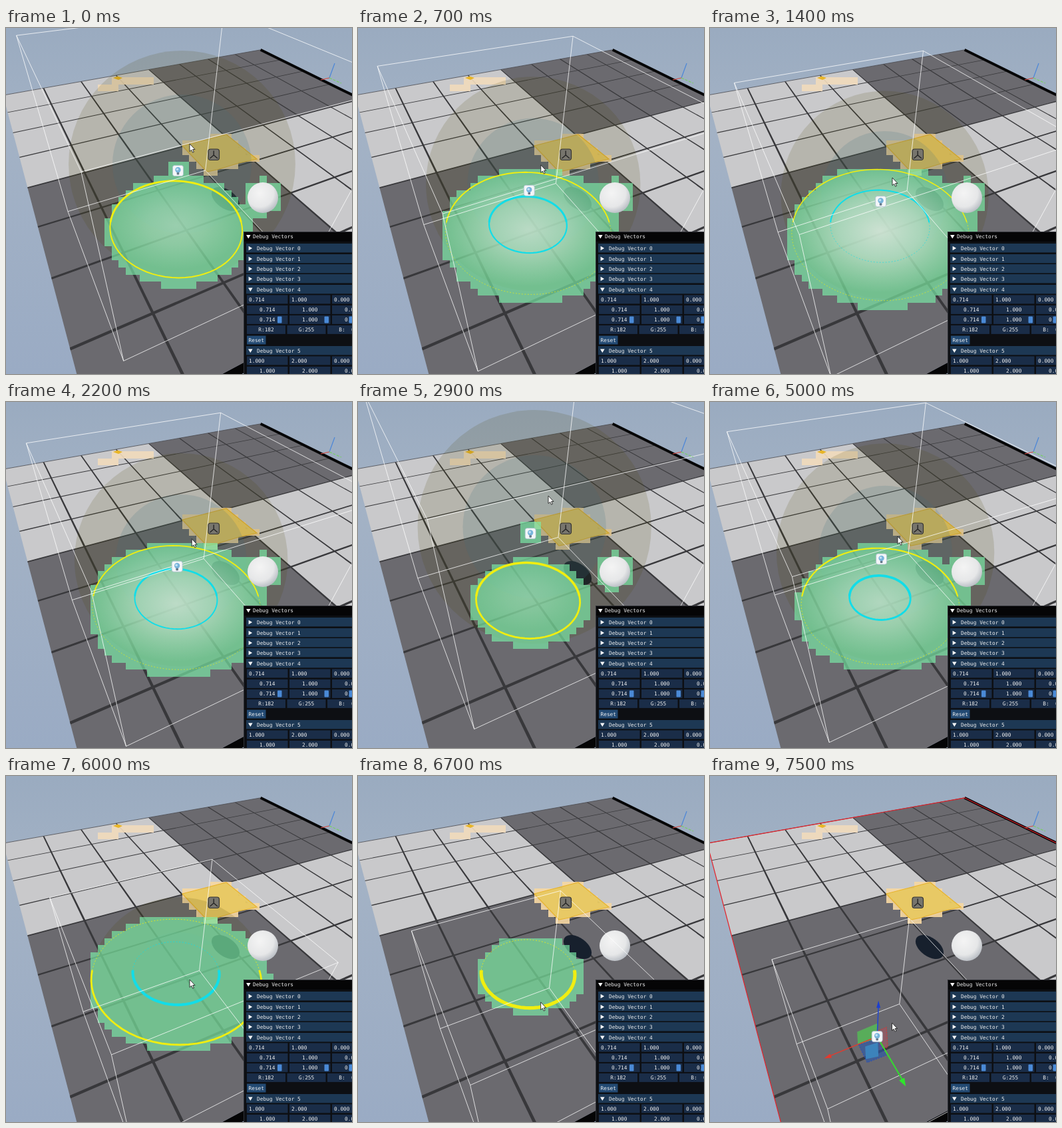
Recreate the animation shown at these times as an HTML page. Size 520 by 520 pixels, loop 7.6 s.

```html
<!DOCTYPE html>
<html>
<head>
<meta charset="utf-8">
<style>
html, body { margin: 0; width: 100%; height: 100%; overflow: hidden; background: #9badc1; }
svg { display: block; width: 520px; height: 520px; }
text { font: 7.8px "DejaVu Sans Mono", "Liberation Mono", monospace; fill: #f0f0f0; white-space: pre; }
</style>
</head>
<body>
<svg viewBox="0 0 520 520" xmlns="http://www.w3.org/2000/svg">
  <defs>
    <linearGradient id="sky" x2="0" y2="1">
      <stop offset="0" stop-color="#9aabc0"/><stop offset=".3" stop-color="#a3b2c5"/><stop offset="1" stop-color="#9aabc4"/>
    </linearGradient>
    <radialGradient id="glow">
      <stop offset="0" stop-color="#f4f0ee"/><stop offset=".45" stop-color="#f0f0ec" stop-opacity=".65"/>
      <stop offset="1" stop-color="#e0f0e4" stop-opacity="0"/>
    </radialGradient>
    <radialGradient id="ball" cx=".4" cy=".35" r=".7">
      <stop offset="0" stop-color="#f4f4f4"/><stop offset=".65" stop-color="#e6e7e8"/><stop offset="1" stop-color="#b4b9c0"/>
    </radialGradient>
    <clipPath id="clipOuter"></clipPath>
    <clipPath id="clipInner"></clipPath>
  </defs>
  <rect width="520" height="520" fill="url(#sky)"/>
  <g id="floor"></g>
  <g id="light"></g>
  <circle cx="386" cy="255" r="23" fill="url(#ball)"/>
  <g id="overlay"></g>
  <g id="panel"></g>
  <path id="cursor" d="M0 0V11.5L2.7 9.2L4.6 13.2L6.4 12.3L4.6 8.5H8Z" fill="#fff" stroke="#111" stroke-width=".8"/>
</svg>
<script>
const LOOP = 7600, STEP = 100, TILE = 10.59;
const OUTER = .987, INNER = .613;
const $ = id => document.getElementById(id);

// Perspective projection; the wire box around the light is two units wide.
function project(a, b, h) {
  const w = 1.011 + .0892 * a - .1896 * b - .2065 * h;
  return [(258.1 + 148.2 * a + 15.7 * b - 48.7 * h) / w,
          (295.15 - 17.2 * a + 37.15 * b - 157.8 * h) / w];
}
const points = list => list.map(p => p.map(v => v.toFixed(1)).join()).join(' ');
const polygon = (list, attrs) => `<polygon points="${points(list)}" ${attrs}/>`;
const polyline = (list, attrs) => `<polyline points="${points(list)}" fill="none" ${attrs}/>`;
const rect = (x, y, w, h, fill, extra = '') =>
  `<rect x="${x}" y="${y}" width="${w}" height="${h}" fill="${fill}" ${extra}/>`;
const tileRow = (row, from, to) =>
  `M${from * TILE} ${row * TILE}H${to * TILE}v${TILE}H${from * TILE}Z`;

const lineA = k => -1.36 + .7035 * k;
const lineB = k => -1.27 + (k < 0 ? .697 : .71) * k;
const A0 = lineA(0), A1 = lineA(8), B0 = lineB(-4), B1 = 1.515;
const floorQuad = (a0, a1, b0, b1, fill) =>
  polygon([project(a0, b0, 0), project(a1, b0, 0), project(a1, b1, 0), project(a0, b1, 0)], `fill="${fill}"`);

function drawFloor() {
  const mid = lineA(4), half = lineB(0), t = .012;
  const dark = '#6b6a6f', pale = '#c9c9cb', seam = '#38383b';
  let out = polygon([project(A0, B1, 0), project(A1, B1, 0), project(A1, B1, -.3), project(A0, B1, -.3)], 'fill="#050506"');
  out += floorQuad(A0, mid, B0, half, pale) + floorQuad(mid, A1, B0, half, dark);
  out += floorQuad(A0, mid, half, B1, dark) + floorQuad(mid, A1, half, B1, pale);
  for (let k = 1; k < 8; k++) {
    out += floorQuad(lineA(k) - t, lineA(k) + t, B0, B1, seam);
    out += floorQuad(A0, A1, lineB(k - 4) - t, lineB(k - 4) + t, seam);
  }
  out += polyline([project(A1, B0, 0), project(A1, B1, 0)], 'stroke="#050506" stroke-width="4"');
  out += polyline([project(A0, B0, 0), project(A1, B0, 0)], 'stroke="#4a4a4e" stroke-width=".8"');
  out += '<ellipse cx="330" cy="257" rx="24" ry="14" transform="rotate(36 330 257)" fill="#17202d"/>';
  const amber = [[15, 29, 32], [16, 25, 33], [17, 25, 34], [18, 26, 36], [19, 27, 33], [20, 28, 30]];
  out += `<path d="${amber.map(r => tileRow(...r)).join('')}" fill="#f6d7a2" fill-opacity=".92" shape-rendering="crispEdges"/>`;
  out += polygon([[265, 177], [331, 160], [377, 197], [350, 203], [317, 213], [302, 216]],
    'fill="#e8ca62" fill-opacity=".95" stroke="#e8b430" stroke-width="1.2"');
  out += `<path d="${tileRow(7, 15, 21) + tileRow(8, 13, 16)}" fill="#f0dbbc" fill-opacity=".92" shape-rendering="crispEdges"/>`;
  out += polygon([[161, 75], [168, 72.5], [175, 75], [169, 78]], 'fill="#e8b526"');
  $('floor').innerHTML = out;
}

function drawPanel() {
  const text = (x, y, s, anchor = 'start') => `<text x="${x}" y="${y + 2.8}" text-anchor="${anchor}">${s}</text>`;
  const arrow = (x, y, open) => `<path d="${open ? `M${x} ${y - 2.5}h6.6l-3.3 5.5z` : `M${x + .6} ${y - 3.3}v6.6l5.5 -3.3z`}" fill="#fff"/>`;
  const header = (y, n, open) => rect(361, y - 7, 170, 13.4, '#1d3854') + arrow(364, y, open) + text(377, y, 'Debug Vector ' + n);
  const fields = (y, values, centred, pitch = 64) => values.map((value, i) => {
    const x = 362 + i * pitch, w = pitch - 2.5;
    return rect(x, y - 6.6, w, 13, '#1a2d48') +
      (centred ? text(x + w / 2, y, value, 'middle') : text(x + 3, y, value));
  }).join('');
  const green = ['0.714', '1.000', '0.000'], plain = ['1.000', '2.000', '0.000'];
  let out = rect(357, 306, 170, 220, '#0d0f13') + rect(357, 306, 170, 15, '#050506') +
    '<path d="M357.5 520V306.5H520" fill="none" stroke="#3b3d44" stroke-width=".8"/>';
  out += arrow(361, 313.5, true) + text(371, 313.5, 'Debug Vectors');
  [331, 347, 362, 377].forEach((y, n) => out += header(y, n, false));
  out += header(393, 4, true) + fields(408, green) + fields(423.5, green, true) + fields(438.5, green, true);
  [[408, 6.5], [478.5, 6.5], [515.5, 6]].forEach(([x, w]) => out += rect(x, 433.5, w, 10, '#4a8ad6', 'rx="1"'));
  out += fields(453.5, ['R:182', 'G:255', 'B:  0'], true, 60.5);
  out += rect(362, 462.5, 28.5, 13, '#234a73') + text(364.5, 469, 'Reset');
  out += header(485, 5, true) + fields(500, plain) + fields(515.5, plain, true);
  $('panel').innerHTML = out;
}

// Smooth interpolation that never overshoots its keys.
function curve(times, values, t) {
  const n = times.length;
  const slope = i => (values[i + 1] - values[i]) / (times[i + 1] - times[i]);
  const tangent = i => {
    if (i === 0) return slope(0);
    if (i === n - 1) return slope(n - 2);
    const p = slope(i - 1), q = slope(i);
    return p * q <= 0 ? 0 : 2 * p * q / (p + q);
  };
  if (t >= times[n - 1]) return values[n - 1];
  let i = 0;
  while (t >= times[i + 1]) i++;
  const d = times[i + 1] - times[i], s = (t - times[i]) / d, s2 = s * s, s3 = s2 * s;
  return values[i] * (2 * s3 - 3 * s2 + 1) + values[i + 1] * (3 * s2 - 2 * s3) +
    d * (tangent(i) * (s3 - 2 * s2 + s) + tangent(i + 1) * (s3 - s2));
}
const times = [0, 1400, 2400, 2900, 4100, 5000, 6000, 7500];
const heights = [.69, .304, .477, .815, 1.258, .518, -.4, -1.31];
const cursorX = [276, 274, 281, 286, 284, 282, 276, 273.5];
const cursorY = [174, 225, 197, 141, 72, 202, 306, 371];

function arc(radius, from, to) {
  const list = [];
  for (let deg = from; deg <= to; deg += 5) {
    const r = deg * Math.PI / 180;
    list.push(project(radius * Math.cos(r), radius * Math.sin(r), 0));
  }
  return list;
}

// Circle where a sphere around the light cuts the floor, or null.
function floorRing(size, h) {
  if (Math.abs(h) >= size) return null;
  const radius = Math.sqrt(size * size - h * h);
  const all = arc(radius, 0, 360), xs = all.map(p => p[0]), ys = all.map(p => p[1]);
  const left = Math.min(...xs), right = Math.max(...xs), top = Math.min(...ys), bottom = Math.max(...ys);
  return { all, front: arc(radius, 25, 205), back: arc(radius, 205, 385),
    cx: (left + right) / 2, cy: (top + bottom) / 2, rx: (right - left) / 2, ry: (bottom - top) / 2 };
}

// The line is thicker where the sphere meets the floor at a grazing view.
function ringStroke(ring, size, h, color) {
  if (!ring) return '';
  const k = h / size;
  const back = k < 0 ? 1 : 1.2 + 3.4 * k * k;
  const front = .8 + 6 * Math.max(0, k - .5) + 5 * Math.max(0, -k);
  const half = (list, w) => polyline(list,
    `stroke="${color}" stroke-width="${w.toFixed(2)}" ${w < 1.2 ? 'stroke-dasharray="2 2.5" stroke-opacity=".8"' : ''}`);
  return half(ring.back, back) + half(ring.front, front);
}

function volume(id, size, h, ring, [x, y], fill) {
  const cut = ring ? ring.cy + 107 * h : h > 0 ? 900 : -300;
  $(id).innerHTML = rect(0, -300, 520, cut + 300, '#000') + (ring ? polygon(ring.all, '') : '');
  const r = 148 * size / (1.011 - .2065 * h);
  return `<circle cx="${x + 6}" cy="${y - 10}" r="${r}" fill="${fill}" clip-path="url(#${id})"/>`;
}

function litTiles(ring, h, iconY) {
  let d = '';
  if (ring) {
    const grow = (5 + 3 * h) / 2;
    const cx = ring.cx + 4, cy = ring.cy + grow, rx = ring.rx + 5, ry = ring.ry + grow;
    for (let row = 0; row < 50; row++) {
      const y = Math.max(row * TILE, Math.min(cy, (row + 1) * TILE)), q = (y - cy) / ry;
      if (Math.abs(q) >= 1) continue;
      const w = rx * Math.sqrt(1 - q * q);
      d += tileRow(row, Math.floor((cx - w) / TILE), Math.ceil((cx + w) / TILE));
    }
  }
  if (h > 0 && h < 1.1) {
    const row = Math.floor((iconY - 11) / TILE);
    for (let i = 0; i < 3; i++) d += tileRow(row + i, 23, 26);
  }
  if (h > -.1 && h < 1.4) {
    const near = h < 1.1;
    d += tileRow(21, 36, 37);
    for (let row = 22; row < (near ? 26 : 25); row++) d += tileRow(row, 34, near ? 39 : 38);
    if (near) d += tileRow(26, 35, 37);
  }
  return `<path d="${d}" fill="#7cf0aa" fill-opacity=".65" shape-rendering="crispEdges"/>`;
}

function wireBox(h) {
  const corners = [[-1, -1], [1, -1], [1, 1], [-1, 1]];
  let d = '';
  corners.forEach(([a, b], i) => {
    const [c, e] = corners[(i + 1) % 4];
    for (const [p, q] of [
      [project(a, b, h - 1), project(a, b, h + 1)],
      [project(a, b, h - 1), project(c, e, h - 1)],
      [project(a, b, h + 1), project(c, e, h + 1)]]) d += `M${p}L${q}`;
  });
  return `<path d="${d}" fill="none" stroke="#fff" stroke-opacity=".85" stroke-width=".9"/>`;
}

const line = (x1, y1, x2, y2, color, w = 1.2, extra = '') =>
  `<path d="M${x1} ${y1}L${x2} ${y2}" stroke="${color}" stroke-width="${w}" ${extra}/>`;

const bulbIcon = (x, y) => `<g transform="translate(${x} ${y})">` +
  rect(-8, -8, 16, 16, '#f4f6f8', 'rx="3" stroke="#a9bfcd" stroke-width=".8"') +
  '<circle cy="-1.2" r="4.2" fill="#78b4dc"/><circle cx="-1" cy="-2" r="1.8" fill="#c4e2f4"/>' +
  rect(-1.8, 2.6, 3.6, 3.4, '#65798a', 'rx=".8"') + '</g>';

const axesIcon = rect(304, 182, 16.5, 16.5, '#77756d', 'rx="3.5" stroke="#333" stroke-width="1.2"') +
  '<path d="M312.2 184.5V191L306.5 196M312.2 191L318 196" fill="none" stroke="#242424" stroke-width="1.4"/>';

const worldAxes = line(486, 75, 494, 53, '#4b86d8') + line(486, 75, 473, 78, '#d84a42') +
  line(486, 75, 504, 83, '#78cf64', 1.2, 'stroke-dasharray="4 2"');

function moveGizmo(x, y) {
  return `<g transform="translate(${x} ${y})">` +
    polygon([[-30, -7], [1, -20], [1, 2], [-29, 13]], 'fill="#55b957" fill-opacity=".85"') +
    polygon([[2, -9], [14, -14], [16, 16], [4, 20]], 'fill="#b54d58" fill-opacity=".45" stroke="#e03030" stroke-dasharray="2 2"') +
    polygon([[-28, 12], [0, 4], [14, 28], [-15, 39]], 'fill="#2b58a6" fill-opacity=".65" stroke="#2449c4" stroke-dasharray="2 2"') +
    polygon([[-18, 15], [1, 9], [2, 30], [-17, 34]], 'fill="#3c83bb"') +
    line(0, 0, 2, -45, '#2448cc', 1.6) + polygon([[2, -54], [5, -43], [-1, -43]], 'fill="#1c3fd0"') +
    line(0, 0, -71, 29, '#e23a2e', 1.6) + polygon([[-80, 33], [-71, 26], [-68, 32]], 'fill="#e23a2e"') +
    line(0, 0, 38, 65, '#35d832', 2) + polygon([[43, 75], [33, 66], [41, 62]], 'fill="#2ee52c"') + '</g>';
}

const selectionOutline = () => polyline(
  [project(A0, B1, 0), project(A0, B0, 0), project(A1, B0, 0), project(A1, B1, 0)],
  'stroke="#e3222a" stroke-width="1.2"');

function render(t) {
  const h = curve(times, heights, t);
  const icon = project(0, 0, h), released = t >= 7200;
  const outer = floorRing(OUTER, h), inner = floorRing(INNER, h);

  let out = volume('clipOuter', 1, h, outer, icon, 'rgba(75,72,0,.15)') +
    volume('clipInner', INNER, h, inner, icon, 'rgba(60,105,125,.17)') + litTiles(outer, h, icon[1]);
  if (outer && h > 0) {
    out += `<ellipse cx="${outer.cx}" cy="${outer.cy - 6}" rx="${outer.rx}" ry="${outer.ry - 6}" ` +
      `fill="url(#glow)" opacity="${(1 - h).toFixed(3)}"/>`;
  }
  out += ringStroke(outer, OUTER, h, '#f0ee10') + ringStroke(inner, INNER, h, '#12dde8');
  $('light').innerHTML = out;

  $('overlay').innerHTML = (released ? selectionOutline() : '') + wireBox(h) + axesIcon + worldAxes +
    (released ? moveGizmo(...icon) : '') + (h > -.02 || released ? bulbIcon(...icon) : '');
  $('cursor').setAttribute('transform',
    `translate(${curve(times, cursorX, t)} ${curve(times, cursorY, t)})`);
}

drawFloor();
drawPanel();
const start = performance.now();
let shown = -1;
function frame() {
  const t = Math.floor(((performance.now() - start) % LOOP) / STEP) * STEP;
  if (t !== shown) render(shown = t);
  requestAnimationFrame(frame);
}
frame();
</script>
</body>
</html>
```
